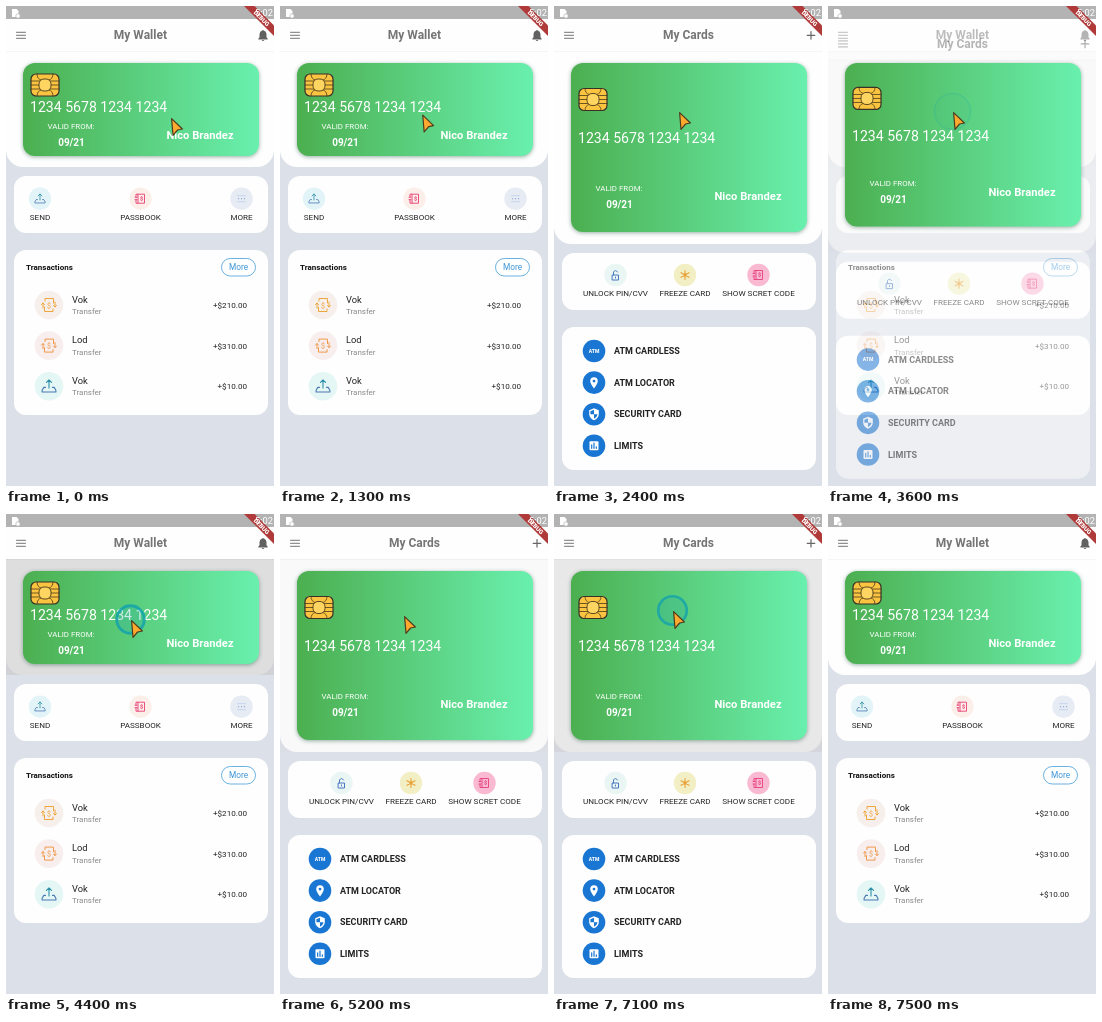
Recreate the animation shown at these times as an HTML page. Size 268 px wide and 480 px high, loop 8.4 s.

```html
<!DOCTYPE html>
<html lang="en">
<head>
<meta charset="utf-8">
<title>Wallet</title>
<style>
  html, body { margin: 0; width: 100%; height: 100%; overflow: hidden; background: #dce0e8; }
  svg { display: block; width: 100%; height: 100%; font-family: Roboto, sans-serif; }
  #card { filter: drop-shadow(0 1.5px 2px rgba(20, 80, 50, .45)); }
</style>
</head>
<body>
<svg id="stage" viewBox="0 0 268 480">
  <defs>
    <linearGradient id="green"><stop stop-color="#4caf50"/><stop offset="1" stop-color="#69f0ae"/></linearGradient>
  </defs>
  <g id="wallet"></g>
  <g id="cards"></g>
  <g id="card"></g>
  <g id="status"></g>
  <circle id="ring" fill="#20a8b0" fill-opacity=".25" stroke="#14a3ad"/>
  <path id="cursor" d="M.6 .6L11.4 11L6.6 12L2 17.4Z" fill="#ffa92e" stroke="#4d3d20" stroke-width="1.2" stroke-linejoin="round"/>
</svg>
<script>
const LOOP = 8400, STEP = 100;
const $ = id => document.getElementById(id);

// Drawing helpers; text is centred vertically on y.
const text = (x, y, size, str, attrs = '') =>
  `<text x="${x}" y="${y + size * .355}" font-size="${size}" ${attrs}>${str}</text>`;
const mid = 'text-anchor="middle" ';
const box = (x, y, w, h, r, fill, attrs = '') =>
  `<rect x="${x}" y="${y}" width="${w}" height="${h}" rx="${r}" fill="${fill}" ${attrs}/>`;
const at = (x, y, body) => `<g transform="translate(${x} ${y})">${body}</g>`;
const line = (d, color, width = 1) =>
  `<path d="${d}" fill="none" stroke="${color}" stroke-width="${width}" stroke-linecap="round" stroke-linejoin="round"/>`;
const badge = (x, y, r, fill, icon) => at(x, y, `<circle r="${r}" fill="${fill}"/>${icon}`);

const receipt = color =>
  line('M-4 -4V-6.5H4.5V-2M4 4V6.5H-4.5V2', color) +
  line('M-6 3V-2M-7.5 -.5L-6 -2L-4.5 -.5M6 -3V2M4.5 .5L6 2L7.5 .5', color) +
  text(0, 0, 7, '$', mid + `fill="${color}"`);
const booklet = color =>
  line('M-2.5 -4.5H4V4.5H-4.5V1M-4.5 -1.5V-4.5H-2.5V4.5M-5.5 -1.5H-3.5M-5.5 1H-3.5', color, .9) +
  text(1, 0, 5.5, '$', mid + `font-weight="700" fill="${color}"`);
const upload = scale => `<g transform="scale(${scale})">` +
  line('M-3 1H-4.5L-6 3.5V5H6V3.5L4.5 1H3', '#4a78b5', .95) +
  line('M0 1.5V-5.5M-2.2 -3.3L0 -5.5L2.2 -3.3', '#2b8fa8', .95) + '</g>';
const padlock = line('M-3 0H3V5H-3ZM-2 0V-3Q0 -6 2 -3M0 2V3', '#4a78c0');
const flake = line('M0 -4.5V4.5M-4 -2.3L4 2.3M-4 2.3L4 -2.3', '#e9a23b', 1.1) + '<circle r="1.8" fill="#e9a23b"/>';
const dots = line('M-4 -3H4M-4 3H4', '#c3d3ec', .9) + line('M-3 0H-2.9M0 0H.1M3 0H3.1', '#8fa9d6', 1.2);
const pin = '<path d="M0 6C-2 3 -3.8 1 -3.8 -1.5A3.8 3.8 0 0 1 3.8 -1.5C3.8 1 2 3 0 6Z" fill="#fff"/><circle cy="-1.5" r="1.4" fill="#1976d2"/>';
const shield = '<path d="M0 -6L4.8 -4V0Q4.5 4 0 6Q-4.5 4 -4.8 0V-4Z" fill="#fff"/><path d="M0 -4.5V0H3.6Q3 3 0 4.5V0H-3.6V-3Z" fill="#1976d2"/>';
const bars = box(-4.5, -4.5, 9, 9, 1, '#fff') + line('M-2.3 2.5V-1M0 2.5V-2.7M2.3 2.5V1', '#1976d2', 1.2);
const atm = text(0, 0, 5, 'ATM', mid + 'font-weight="900" fill="#fff"');

const bell = at(257, 29.5, '<path d="M-4.6 4V3L-3.5 1.7V-1.5Q-3.3 -4.3 -.8 -4.9Q0 -6.3 .8 -4.9Q3.3 -4.3 3.5 -1.5V1.7L4.6 3V4ZM-1.4 4.6H1.4Q0 6.6 -1.4 4.6Z" fill="#616161"/>');
const plus = line('M253.2 29.3H260.8M257 25.5V33.1', '#666', 1.2);

function pageTop(title, action, panelBottom, highlight) {
  return box(0, 0, 268, 480, 0, '#dce0e8') +
    box(0, 30, 268, panelBottom - 30, 17, '#fefefe') +
    box(0, 45, 268, panelBottom - 45, 0, '#c8c8c8', `opacity="${highlight}"`) +
    box(0, 0, 268, 45, 0, '#fefefe') + box(0, 45, 268, .7, 0, '#000', 'opacity=".05"') +
    line('M10.5 26.3H19.5M10.5 29.3H19.5M10.5 32.3H19.5', '#757575', 1) +
    text(134.4, 29, 12, title, mid + 'font-weight="700" fill="#757575"') + action;
}

const panel = (y, h) => box(8, y, 254, h, 12, '#fefefe');
const actions = (y, items) => items.map(([x, label, fill, icon]) =>
  badge(x, y, 11.2, fill, icon) + text(x, y + 18.6, 8.1, label, mid + 'fill="#222"')).join('');

const transactions = [
  ['Vok', '+$210.00', '#f7efec', receipt('#eda63c')],
  ['Lod', '+$310.00', '#f8eeee', receipt('#ee9a4a')],
  ['Vok', '+$10.00', '#e4f7f5', upload(1.15)]
];
const walletBody =
  panel(170, 57) +
  actions(192.7, [
    [34, 'SEND', '#e2f4f7', upload(.85)],
    [134.5, 'PASSBOOK', '#fcefea', booklet('#e83e74')],
    [235.5, 'MORE', '#e6ebf4', dots]
  ]) +
  panel(244, 165) +
  text(20, 261.3, 8, 'Transactions', 'font-weight="700" fill="#111"') +
  box(215.5, 252.5, 34, 17.5, 8.75, '#fff', 'stroke="#5aa9de" stroke-width=".9"') +
  text(232.5, 261.3, 8.3, 'More', mid + 'fill="#3f97d8"') +
  transactions.map(([name, amount, fill, icon], i) => {
    const y = 299 + i * 40.6;
    return badge(43, y, 14.3, fill, icon) + text(66, y - 5.8, 9.3, name, 'fill="#222"') +
      text(66, y + 6.2, 8, 'Transfer', 'fill="#8a8a8a"') +
      text(241, y + .3, 8.1, amount, 'text-anchor="end" fill="#222"');
  }).join('');

const cardsBody =
  panel(247, 57) +
  actions(269, [
    [61.5, 'UNLOCK PIN/CVV', '#e9f6f4', padlock],
    [131, 'FREEZE CARD', '#f2efc4', flake],
    [204.5, 'SHOW SCRET CODE', '#f9b9d1', booklet('#e8407c')]
  ]) +
  panel(321, 143) +
  [['ATM CARDLESS', atm], ['ATM LOCATOR', pin], ['SECURITY CARD', shield], ['LIMITS', bars]]
    .map(([label, icon], i) => {
      const y = 345 + i * 31.6;
      return badge(40, y, 11.3, '#1976d2', icon) + text(60, y, 9, label, 'font-weight="700" fill="#222"');
    }).join('');

const chip = box(-14, -11, 28, 22, 5, '#fbc440', 'stroke="#3a3028" stroke-width="1.2"') +
  line('M-14 -4H-5M-14 0H-6M-14 4H-5M14 -4H5M14 0H6M14 4H5M-8 -11Q-8 -6 -4 -5M8 -11Q8 -6 4 -5M-8 11Q-8 6 -4 5M8 11Q8 6 4 5', '#4a3a1c', .8) +
  box(-6, -6, 12, 12, 5, '#ffd561', 'stroke="#4a3a1c" stroke-width=".9"');

function bankCard(p) {
  const y = (small, large) => small + (large - small) * p;
  const white = 'fill="#fff" ';
  return box(17, 57, 236, y(93, 169), 12, 'url(#green)') +
    at(39, y(79, 93.5), chip) +
    text(24, y(101.3, 132.2), 14.1, '1234 5678 1234 1234', white) +
    text(65, y(120, 182), 7.9, 'VALID FROM:', white + mid) +
    text(65.5, y(136.3, 198), 10, '09/21', white + mid + 'font-weight="700"') +
    text(194, y(129.3, 190.5), 11.2, 'Nico Brandez', white + mid + 'font-weight="700"');
}

$('status').innerHTML = box(0, 0, 268, 13, 0, '#b3b3b3') +
  '<path d="M238 0H248.5L268 19.5V30Z" fill="#b03a3a"/>' +
  `<g transform="translate(255.7 12.3) rotate(45)">${text(0, 0, 6.1, 'DEBUG', mid + 'font-weight="900" fill="#fff"')}</g>` +
  text(267, 7, 9.3, '5:02', 'text-anchor="end" fill="#fff"') +
  '<path d="M6 3H10.5L12.5 5V11H6Z" fill="#fff"/><circle cx="12" cy="10" r="2.2" fill="#fff" stroke="#b3b3b3" stroke-width=".7"/>';

// Keys are [time, ...values], joined by straight lines.
function sample(keys, t) {
  const i = keys.findIndex(k => k[0] > t);
  if (i < 0) return keys[keys.length - 1].slice(1);
  const a = keys[i - 1], b = keys[i], f = (t - a[0]) / (b[0] - a[0]);
  return a.slice(1).map((v, j) => v + (b[j + 1] - v) * f);
}

const pageKeys = [[0, 0], [1700, 0], [1800, .73], [1900, 1], [3500, 1], [3600, .68], [3700, .35], [3800, 0],
  [4400, 0], [4500, .2], [4800, 1], [7100, 1], [7200, .5], [7300, .15], [7400, 0]];
const highlightKeys = [[0, 0], [1700, 0], [1800, .12], [2400, 0], [3100, 0], [3600, .1], [3800, 0],
  [4000, 0], [4400, .58], [4500, .1], [6800, .1], [7100, .42], [7200, 0]];
const cursorKeys = [[0, 165, 112], [900, 165, 112], [1600, 125, 106], [4600, 125, 106], [4700, 121, 113],
  [4900, 121, 113], [5000, 125, 102], [5100, 125, 102], [5200, 124, 102], [5400, 124, 102], [5600, 149, 120],
  [5900, 149, 120], [6000, 196, 178], [6100, 196, 178], [6200, 105, 240], [6300, 133, 389], [6400, 133, 389],
  [6900, 119, 97]];
const clicks = [3280, 4250, 6930], RING_TIME = 400;

// Cubic Bezier easing solved by bisection.
function bezier(x1, y1, x2, y2, x) {
  const curve = (a, b, s) => 3 * a * s * (1 - s) ** 2 + 3 * b * s * s * (1 - s) + s ** 3;
  let lo = 0, hi = 1;
  for (let i = 0; i < 20; i++) {
    const s = (lo + hi) / 2;
    if (curve(x1, x2, s) < x) lo = s; else hi = s;
  }
  return curve(y1, y2, (lo + hi) / 2);
}

function setAttributes(id, attributes) {
  for (const name in attributes) $(id).setAttribute(name, attributes[name]);
}

function render(t) {
  const [progress] = sample(pageKeys, t), [highlight] = sample(highlightKeys, t);
  const slide = bezier(.4, 0, .2, 1, progress);
  $('wallet').innerHTML = pageTop('My Wallet', bell, 161, highlight) + walletBody;
  $('cards').innerHTML = progress ? pageTop('My Cards', plus, 238, highlight) + cardsBody : '';
  setAttributes('cards', {
    opacity: bezier(.42, 0, 1, 1, progress),
    transform: `translate(0 ${120 * (1 - slide)})`
  });
  $('card').innerHTML = bankCard(slide);

  const [x, y] = sample(cursorKeys, t);
  setAttributes('cursor', {
    transform: `translate(${x} ${y})`,
    visibility: t < 7500 ? 'visible' : 'hidden'
  });

  const click = clicks.find(c => t >= c && t < c + RING_TIME);
  const age = click === undefined ? 1 : (t - click) / RING_TIME;
  setAttributes('ring', {
    cx: x - .5, cy: y - .5, r: 10 + age * 10,
    'stroke-width': 4 - 3 * age,
    opacity: 1 - age ** 2
  });
  if (age > .7) setAttributes('ring', { opacity: 1 - age });
}

let shown = -1;
function tick() {
  const t = Math.floor(performance.now() % LOOP / STEP) * STEP;
  if (t !== shown) render(shown = t);
  requestAnimationFrame(tick);
}
tick();
</script>
</body>
</html>
```
